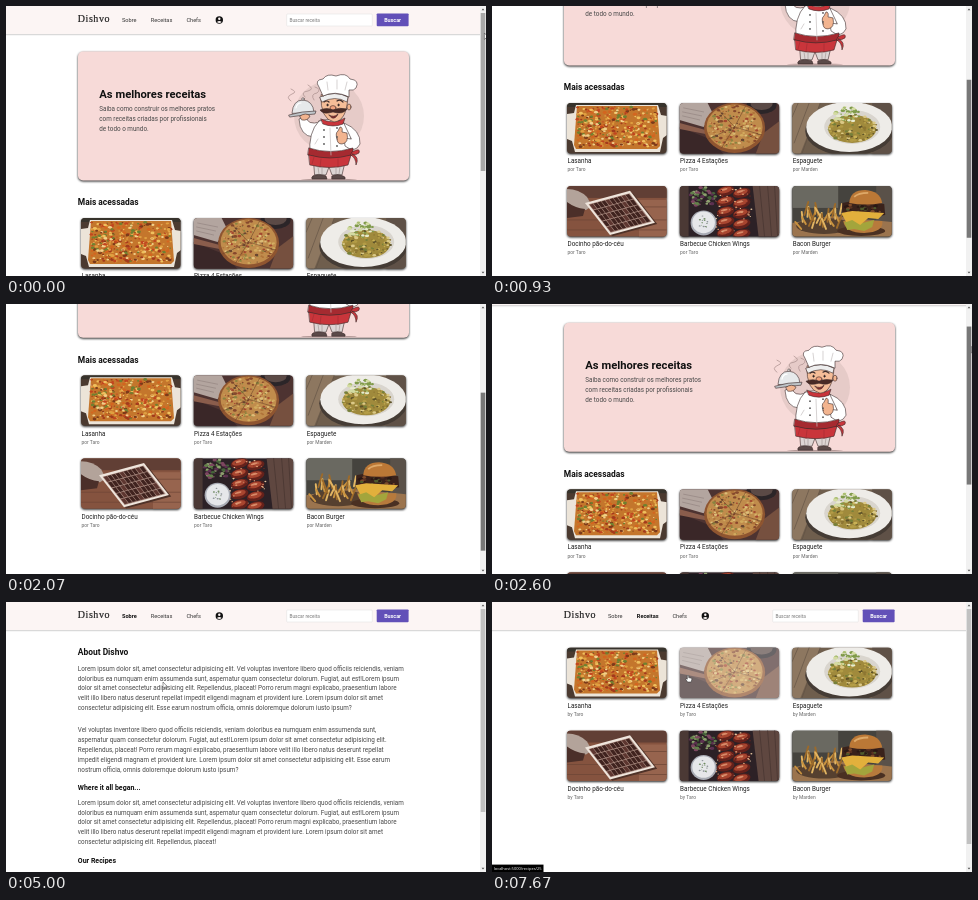
Write an HTML page that moves like this. It is 480 px wide and 270 px high and loops after 8 s.

```html
<!DOCTYPE html>
<html lang="pt">
<head>
<meta charset="utf-8">
<title>Receitas</title>
<style>
  html, body { margin: 0; width: 100%; height: 100%; overflow: hidden; background: #fff; }
  svg { display: block; width: 100%; height: 100%; font-family: Roboto, sans-serif; }
  .shade { filter: drop-shadow(0 1.1px 1.3px rgba(0, 0, 0, .85)); }
  .soft { filter: drop-shadow(0 .8px 1px rgba(0, 0, 0, .45)); }
  .ink { stroke: #3b2b2b; stroke-width: .6; stroke-linejoin: round; stroke-linecap: round; }
</style>
</head>
<body>
<svg id="stage" viewBox="0 0 480 270" preserveAspectRatio="none"></svg>
<script>
const LOOP = 8000;
const stage = document.getElementById('stage');

// Markup helpers
const text = (x, y, size, str, fill = '#444', more = '') =>
  `<text x="${x}" y="${y}" font-size="${size}" fill="${fill}" ${more}>${str}</text>`;
const bold = (x, y, size, str, fill = '#111', more = '') =>
  text(x, y, size, str, fill, 'font-weight="700" ' + more);
const rect = (x, y, w, h, fill, more = '') =>
  `<rect x="${x}" y="${y}" width="${w}" height="${h}" fill="${fill}" ${more}/>`;
const oval = (x, y, rx, ry, fill, more = '') =>
  `<ellipse cx="${x}" cy="${y}" rx="${rx}" ry="${ry}" fill="${fill}" ${more}/>`;
const path = (d, fill, more = '') => `<path d="${d}" fill="${fill}" ${more}/>`;
const line = (d, color, w) =>
  path(d, 'none', `stroke="${color}" stroke-width="${w}" stroke-linecap="round"`);

function random(seed) {
  return () => (seed = (seed * 16807) % 2147483647) / 2147483647;
}

// Scattered bits inside an ellipse (round) or a box
function bits(seed, n, cx, cy, rx, ry, colors, size, round = true) {
  const rnd = random(seed * 7919);
  let out = '';
  for (let i = 0; i < n; i++) {
    const a = rnd() * 6.283, d = Math.sqrt(rnd()), u = rnd() * 2 - 1, v = rnd() * 2 - 1;
    const x = cx + rx * (round ? Math.cos(a) * d : u);
    const y = cy + ry * (round ? Math.sin(a) * d : v);
    const s = size * (.5 + rnd());
    out += oval(x.toFixed(1), y.toFixed(1), s.toFixed(1), (s * .7).toFixed(1),
      colors[Math.floor(rnd() * colors.length)]);
  }
  return out;
}

// Dishes, each 100 by 51
const lasagna = () =>
  rect(0, 0, 100, 51, '#4b3a30') + rect(0, 0, 100, 4, '#37332c') +
  path('M0 11 7 10 9 2H91L94 12 100 13V32L96 35 93 49H8L5 38 0 36Z', '#ece4d8') +
  path('M10 3H90L93 43 90 46H9L7 42Z', '#c4762c') +
  bits(11, 420, 50, 24, 40, 20, ['#e0a041', '#c2451f', '#efc05e', '#d4651f', '#6f8030', '#a33a1c', '#f1d08a', '#7c3a1a'], 1.4, false);

const pizza = () =>
  rect(0, 0, 100, 51, '#4d3331') + path('M0 24 30 36 44 51H0Z', '#3a2728') +
  path('M0 0H28L33 10 24 24 0 17Z', '#b3a59f') + line('M4 5 24 9M3 9 22 13M3 13 20 17', '#8f807c', .6) +
  path('M0 20 26 27 26 31 0 26Z', '#8a5d4c') +
  oval(82, 2, 15, 9, '#2b2528') + oval(82, 1, 11, 6, '#5b4a46') + path('M84 30 100 18V51H76Z', '#76503f') +
  oval(55, 25, 30.5, 25, '#8f5530') + oval(55, 24, 28, 22.5, '#c08c4c') +
  bits(23, 210, 55, 24, 27, 21.5, ['#d2ab5e', '#b0743a', '#86482c', '#dcbd78', '#8a8440', '#a3482f', '#6a4630'], 1.3) +
  line('M55 24 29 36M55 24 42 45M55 24 66 3M55 24 82 32M55 24 38 6', '#70452a', .6);

const pasta = () =>
  rect(0, 0, 100, 51, '#6f5e4d') + path('M0 0H28L8 51H0Z', '#8d7760') +
  line('M6 0 0 14M17 0 2 40M28 0 10 50', '#5f5042', .6) + rect(80, 0, 20, 51, '#5f5147') +
  oval(57, 28, 44, 25, '#453c35') + oval(57, 24, 43, 25, '#eeece8') +
  oval(60, 24, 28, 17, '#d9d5ce') + oval(60, 26, 24, 14, '#a08a3c') +
  bits(5, 130, 60, 25, 25, 14, ['#c9b155', '#8d7632', '#77803a', '#dbc987', '#5d5228', '#b39c46'], 1.4) +
  bits(9, 45, 55, 12, 13, 8, ['#d3dba2', '#a9bd70', '#e8ebd0', '#7f9a4a'], 1.6);

// White tray with rows of long dark bars
function sweets() {
  let bars = '';
  for (let r = 0; r < 5; r++) for (let c = 0; c < 10; c++)
    bars += rect(2.6 + c * 4, 3 + r * 6.8, 3.4, 6, (r + c) % 4 ? '#40231f' : '#5d3630');
  return rect(0, 0, 100, 51, '#85533f') + rect(0, 0, 100, 12, '#613f35') + rect(72, 14, 28, 37, '#97644e') +
    line('M0 21H100M0 34H100M0 44H100', '#6c4536', .7) +
    path('M0 3Q12 3 20 11L25 20 19 24Q6 23 0 19Z', '#b3a39a') + path('M0 16Q8 22 18 23L16 30 0 32Z', '#4b2f29') +
    `<g transform="matrix(1 -.27 .64 .82 18 17)">` +
    rect(1, 3, 45, 38, '#4f3228') + rect(0, 0, 45, 39, '#efe5dc') + rect(2, 2.4, 41, 34.6, '#a88a7f') + bars + '</g>';
}

function wings() {
  let out = rect(0, 0, 100, 51, '#2c2126') + rect(0, 0, 9, 51, '#4b3935') +
    path('M73 0H100V51H79Z', '#5f4740') + line('M80 0 85 51M88 0 92 51M95 0 98 51', '#4a3632', .8) +
    bits(31, 55, 23, 11, 13, 10, ['#46633a', '#63804a', '#7d4660', '#5c3050', '#8fa070'], 1.6);
  for (let r = 0; r < 5; r++) for (let c = 0; c < 2; c++) {
    const x = 46 + c * 16, y = 5 + r * 10.3 + c * 2, turn = `transform="rotate(-14 ${x} ${y})"`;
    out += oval(x, y, 9, 4.8, '#64211b', turn) + oval(x - .5, y - 1, 7, 3, '#a8452f', turn) +
      oval(x - 1, y - 1.8, 3.5, 1, '#d88a68', turn);
  }
  return out + bits(8, 60, 54, 25, 18, 24, ['#d99a72', '#7a281e', '#e8c7a0', '#46181a'], .8, false) +
    oval(24, 37, 13, 12.5, '#a9acb5') + oval(24, 36.5, 11.3, 10.8, '#e6e7ea') +
    bits(4, 16, 24, 36, 7, 6, ['#6f8a62', '#8c9298'], .8);
}

const burger = () =>
  rect(0, 0, 100, 51, '#45433e') + rect(0, 0, 46, 22, '#6a6961') + rect(84, 0, 16, 36, '#5a5149') +
  path('M0 37 40 30 100 36V51H0Z', '#9b744e') + oval(32, 40, 28, 8, '#56402f') +
  [...Array(26).keys()].map(i => {
    const x = 9 + i * 1.55, y = 43 - i * 7 % 16, dx = i * 5 % 13 - 6;
    return line(`M${x} ${y}l${dx} ${-7 - i % 3 * 3}`, ['#c8923f', '#e2b563', '#9c6a2a'][i % 3], 1.9);
  }).join('') +
  oval(69, 45, 24, 5, '#4a3022') +
  path('M51 35H90Q92 46 72 47 53 47 51 35Z', '#b77a3c') +
  path('M52 36 60 33 70 37 82 34 80 41 72 45 62 43 55 44Z', '#a3a53c') +
  path('M50 17Q70 12 92 18L93 29Q72 34 50 28Z', '#3a221b') +
  bits(17, 45, 71, 23, 20, 6, ['#5a3222', '#2a1814', '#7d4a2a', '#4f5a2c'], 1.6) +
  path('M49 27 60 25 92 27 86 33 76 32 68 39 60 34 54 36Z', '#e2b03c') +
  path('M57 17Q58 4 73 4 88 5 90 17 73 20 57 17Z', '#bb7836') +
  path('M62 11Q66 7 76 7', 'none', 'stroke="#deA968" stroke-width="1.8"');

const dishes = [
  ['Lasanha', 'Taro', lasagna], ['Pizza 4 Estações', 'Taro', pizza], ['Espaguete', 'Marden', pasta],
  ['Docinho pão-do-céu', 'Taro', sweets], ['Barbecue Chicken Wings', 'Taro', wings], ['Bacon Burger', 'Marden', burger]
];

const cards = (top, by) => dishes.map(([name, author, draw], i) => {
  const x = 75 + i % 3 * 112.6, y = top + Math.floor(i / 3) * 83;
  return `<g transform="translate(${x} ${y})" class="card"><g class="shade">` +
    `<g clip-path="url(#round)">${draw()}</g></g>` +
    text(.5, 60.3, 6.33, name, '#222') + text(.5, 68.4, 4.92, `${by} ${author}`, '#666') + '</g>';
}).join('');

function header(active) {
  const nav = [[116, 'Sobre'], [144.8, 'Receitas'], [180.4, 'Chefs']];
  return rect(-5, -5, 485, 33, '#fcf5f4', 'class="soft"') +
    text(71.8, 16.4, 10, 'Dishvo', '#222',
      'font-family="Liberation Serif, serif" letter-spacing=".55" stroke="#222" stroke-width=".2"') +
    nav.map(([x, s]) => s === active ? bold(x, 16.2, 5.62, s) : text(x, 16.2, 5.62, s, '#333')).join('') +
    oval(213.3, 14, 3.7, 3.7, '#111') + oval(213.3, 12.8, 1.2, 1.2, '#fcf5f4') +
    path('M210.9 16Q213.3 13.9 215.7 16 213.3 18 210.9 16Z', '#fcf5f4') +
    rect(280.7, 8, 85.6, 12, '#fff', 'rx=".8" stroke="#ddd" stroke-width=".5"') +
    text(283.5, 15.8, 4.75, 'Buscar receita', '#777') +
    rect(370.7, 7.4, 31.9, 12.8, '#6250b8', 'rx=".9"') +
    bold(386.6, 15.9, 5.4, 'Buscar', '#fff', 'text-anchor="middle"');
}

const chef = () => oval(323, 110, 35, 35, '#e6cbc8') + oval(323, 173.4, 28, .7, '#b59a98') + '<g class="ink">' +
  // legs and shoes
  path('M308 156 339 156 336 169H326L323 161 320 169H309Z', '#ddd5d4') +
  path('M307 170Q312 167 320 170L321 173H306Q305 171 307 170ZM326 170Q332 167 337 170 340 171 339 173H326Z', '#5b4a49') +
  // raised arm, body, thumb-up arm
  path('M314 116Q301 120 300 110L293 113Q294 130 307 131Z', '#fff') +
  path('M313 115Q323 112 336 115 347 123 346 149 324 156 304 149 302 126 313 115Z', '#fff') +
  path('M338 117Q355 124 354 138 349 148 339 140L338 132 345 133Z', '#fff') +
  path('M331 133Q329 127 332 125L334 121Q337 121 336 126L341 127Q343 137 336 138 331 138 331 133Z', '#f2b48f') +
  // apron and bow
  path('M303 142Q324 149 347 142L347 149Q324 156 302 149Z', '#a52a30') +
  path('M303 149Q324 155 345 149L342 159Q324 164 304 159Z', '#c9353b') +
  path('M346 146Q355 141 353 147 349 150 346 148 354 151 350 159 350 152 345 149Z', '#c9353b') +
  path('M315 113Q327 119 339 112L337 118Q327 122 317 118Z', '#c9353b') +
  // head
  path('M315 89Q314 113 328 116 341 115 342 90Z', '#f5bd98') +
  oval(343, 101, 2, 3, '#f2b48f') +
  path('M314 91Q329 84 342 91L341 96Q329 89 316 96Z', '#eee') +
  path('M317 90 313 81Q308 74 317 73 321 67 330 70 340 66 344 73 354 74 350 82 348 85 343 84L343 91Q329 84 317 90Z', '#fff') +
  // face
  line('M318 96Q321 94 323 96M331 95Q334 93 337 96', '#3b2b2b', 1.2) +
  oval(321.5, 99, .7, 1, '#222') + oval(332.5, 99, .7, 1, '#222') +
  oval(327, 102, 3, 2.4, '#f0a27e') +
  path('M327 104Q321 101 314 104 317 109 327 106 337 109 341 103 333 101 327 104Z', '#4a2b25') +
  path('M323 109Q328 112 332 108 330 113 326 112Z', '#8c2f2c') +
  // cloche
  path('M286 107Q287 94 297 94 307 95 308 106Z', '#e6e9eb') + oval(297, 93, 1.3, 1.2, '#fff') +
  path('M283 109Q296 105 310 105L309 108Q296 109 284 111Z', '#bfc5c9') +
  path('M294 110Q300 106 304 110 302 115 296 114Z', '#f2b48f') + '</g>' +
  line('M321 76 322 84M331 74V83M341 76 339 84M324 122 325 149M312 133 309 138', '#c5bfbf', .7) +
  line('M312 161 313 168M316 161 316 168M330 161 330 168M334 161 333 168', '#9c908f', .6) +
  [0, 1, 2].map(i => oval(318, 124 + i * 7, .9, .9, '#555') + oval(331, 122 + i * 9, .9, .9, '#555')).join('') +
  line('M290 102Q291 97 295 97', '#fff', 1.2) +
  line('M285 95Q279 91 286 88 292 86 285 83M299 91Q294 86 302 85 309 83 302 79M308 94Q304 88 311 87 316 83 309 81', '#a98f8d', .7) +
  line('M306 158 308 151M314 161 315 153M332 161 332 153', '#992b30', .5);

const hero = () =>
  rect(72, 45.5, 331, 129, '#f7dad8', 'rx="5" class="shade"') +
  bold(93.3, 92, 11.24, 'As melhores receitas') +
  ['Saiba como construir os melhores pratos', 'com receitas criadas por profissionais', 'de todo o mundo.']
    .map((s, i) => text(93.3, 104.8 + i * 9.9, 6.33, s, '#4a4a4a')).join('') +
  chef() + bold(71.8, 199.4, 8.43, 'Mais acessadas');

const open = [
  'Lorem ipsum dolor sit, amet consectetur adipisicing elit. Vel voluptas inventore libero quod officiis reiciendis, veniam',
  'doloribus ea numquam enim assumenda sunt, aspernatur quam consectetur dolorum. Fugiat, aut est!Lorem ipsum',
  'dolor sit amet consectetur adipisicing elit. Repellendus, placeat! Porro rerum magni explicabo, praesentium labore',
  'velit illo libero natus deserunt repellat impedit eligendi magnam et provident iure. Lorem ipsum dolor sit amet'
];
const middle = [
  'Vel voluptas inventore libero quod officiis reiciendis, veniam doloribus ea numquam enim assumenda sunt,',
  'aspernatur quam consectetur dolorum. Fugiat, aut est!Lorem ipsum dolor sit amet consectetur adipisicing elit.',
  'Repellendus, placeat! Porro rerum magni explicabo, praesentium labore velit illo libero natus deserunt repellat',
  'impedit eligendi magnam et provident iure. Lorem ipsum dolor sit amet consectetur adipisicing elit. Esse earum',
  'nostrum officia, omnis doloremque dolorum iusto ipsum?'
];
const para = (y, lines) => lines.map((s, i) => text(71.8, y + i * 9.8, 6.34, s, '#4a4a4a')).join('');

const about = () => bold(71.8, 53.3, 8.43, 'About Dishvo') +
  para(68.7, [...open, 'consectetur adipisicing elit. Esse earum nostrum officia, omnis doloremque dolorum iusto ipsum?']) +
  para(130.4, middle) + bold(71.8, 188, 7.03, 'Where it all began...') +
  para(202.7, [...open, 'consectetur adipisicing elit. Repellendus, placeat!']) +
  bold(71.8, 260.5, 7.03, 'Our Recipes');

stage.innerHTML =
  `<defs><clipPath id="round">${rect(0, 0, 99.6, 50.6, '#000', 'rx="4"')}</clipPath></defs>` +
  `<g id="home">${hero()}${cards(212, 'por')}${header()}</g>` +
  `<g id="about">${about()}${header('Sobre')}</g>` +
  `<g id="recipes">${cards(45.5, 'by')}${header('Receitas')}</g>` +
  rect(474, 0, 6, 270, '#f1f1f1') + path('M475.6 4.2 477 2.4 478.4 4.2ZM475.6 265.8 477 267.6 478.4 265.8Z', '#555') +
  rect(474.7, 7, 4.6, 158, '#c1c1c1', 'id="thumb"') +
  `<g id="status">${rect(0, 262.6, 51.5, 7.4, '#000', 'id="statusBox"')}` +
  text(1.8, 267.8, 4, '', '#fff', 'id="statusText" font-family="Open Sans, sans-serif"') + '</g>' +
  `<g id="cursor">${path('M0 0V6.4L1.5 5.1 2.5 7.2 3.4 6.8 2.4 4.8H4.5Z', '#fff', 'id="arrow" stroke="#222" stroke-width=".45"')}` +
  path('M-.7.6Q0-.5.7.6V2.6L3.4 3.2Q4 3.4 3.8 4.4L3.2 7H-.4L-2.3 4.2Q-2 3.2-.7 4.2Z', '#fff', 'id="hand" stroke="#222" stroke-width=".5"') + '</g>';

const $ = id => document.getElementById(id);
const show = (id, on) => $(id).setAttribute('display', on ? 'inline' : 'none');
const move = (id, x, y) => $(id).setAttribute('transform', `translate(${x} ${y})`);
const pizzaCard = document.querySelectorAll('#recipes .card')[1].firstChild;

// Linear path through [time, ...values]
function follow(keys, t) {
  const next = keys.findIndex(k => k[0] > t);
  if (next === 0) return keys[0].slice(1);
  if (next < 0) return keys[keys.length - 1].slice(1);
  const a = keys[next - 1], b = keys[next], f = (t - a[0]) / (b[0] - a[0]);
  return a.slice(1).map((v, i) => v + (b[i + 1] - v) * f);
}

const scrollKeys = [[70, 0], [930, 115], [1550, 169], [1930, 169], [2070, 141], [2600, 27], [2740, 0]];
const pointerKeys = [
  [70, 478.4, 27], [400, 481, 27], [2400, 481, 27], [2800, 478, 27],
  [3300, 440, 18], [3640, 385, 13], [3900, 127.5, 16.5], [4470, 127.5, 16.5],
  [4950, 157, 80], [5670, 157, 80], [6400, 156.3, 26.5], [6470, 156, 17], [7070, 156, 17], [7600, 196, 73]
];
const between = (t, a, b) => t >= a && t < b;

function draw(t) {
  const page = t < 4470 ? 'home' : t < 7070 ? 'about' : 'recipes';
  for (const id of ['home', 'about', 'recipes']) show(id, id === page);

  const [scroll] = follow(scrollKeys, t), drag = scroll * .58;
  move('home', 0, -scroll);
  $('thumb').setAttribute('y', 7 + drag);
  $('thumb').setAttribute('height', { home: 158, about: 203, recipes: 235 }[page]);
  $('thumb').setAttribute('fill', t < 70 ? '#a8a8a8' : t < 2800 ? '#787878' : '#c1c1c1');

  const [x, y] = follow(pointerKeys, t);
  move('cursor', x, y + drag);
  const overPizza = t >= 7070 && x > 187 && y > 45;
  const hand = between(t, 3860, 4540) || between(t, 6440, 7120) || overPizza;
  show('hand', hand);
  show('arrow', !hand);
  pizzaCard.setAttribute('opacity', overPizza ? .7 : 1);

  const link = between(t, 4130, 4470) ? 'about' : between(t, 6600, 7070) ? 'recipes' : overPizza ? 'recipes/25' : '';
  show('status', link);
  $('statusText').textContent = 'localhost:5000/' + link;
  $('statusBox').setAttribute('width', { about: 40, recipes: 45 }[link] || 51.5);
}

function frame(now) {
  draw(now % LOOP);
  requestAnimationFrame(frame);
}
draw(0);
requestAnimationFrame(frame);
</script>
</body>
</html>
```
